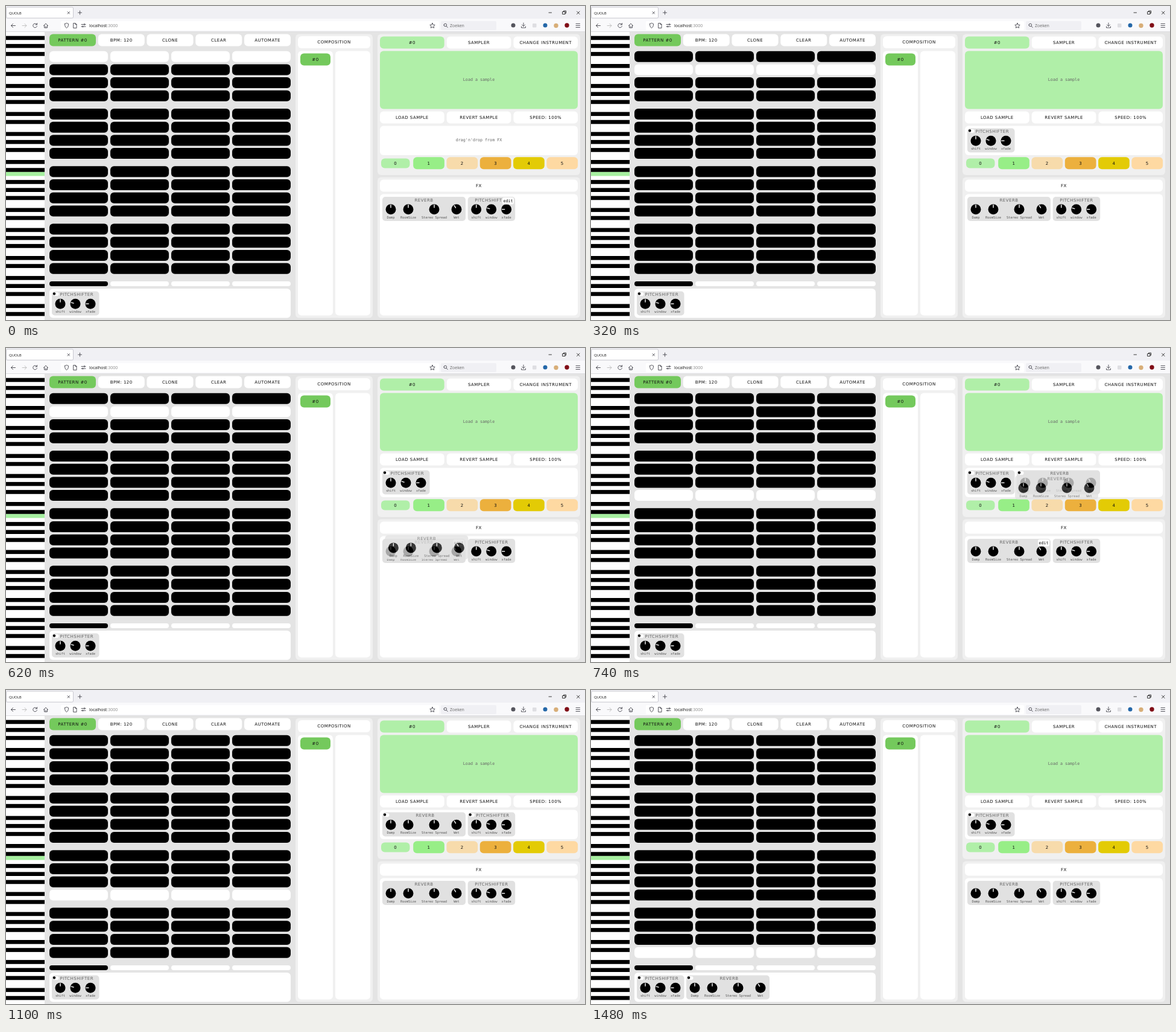
Animation, 960 px wide and 520 px high, one loop 1500 ms. Source, as an HTML page:

```html
<!DOCTYPE html>
<html lang="en">
<head>
<meta charset="utf-8">
<title>Pattern sequencer</title>
<style>
html, body { margin: 0; width: 100%; height: 100%; overflow: hidden; background: #e4e4e4; }
svg { display: block; width: 960px; height: 520px; }
text { fill: #111; }
.caps { font: 7px "DejaVu Sans", sans-serif; letter-spacing: .5px; }
.low { font: 6.7px "DejaVu Sans Mono", monospace; }
.tiny { font: 5.4px "DejaVu Sans Mono", monospace; fill: #555; }
.ui { font: 7px "Open Sans", sans-serif; }
.mid { text-anchor: middle; }
.soft { fill: #666; }
.icon { fill: none; stroke: #45454d; stroke-width: .9; stroke-linecap: round; stroke-linejoin: round; }
</style>
</head>
<body>
<svg id="stage" viewBox="0 0 960 520"></svg>
<script>
const LOOP = 1500, STEP = 20;
const stage = document.getElementById('stage');

function add(parent, tag, attrs, content) {
  const el = document.createElementNS('http://www.w3.org/2000/svg', tag);
  for (const key in attrs) el.setAttribute(key, attrs[key]);
  if (content !== undefined) el.textContent = content;
  parent.appendChild(el);
  return el;
}
const box = (x, y, width, height, fill = '#fff', rx = 0, parent = stage) =>
  add(parent, 'rect', { x, y, width, height, fill, rx });
const label = (x, y, str, cls = 'caps mid', parent = stage) =>
  add(parent, 'text', { x, y, class: cls }, str);
const dot = (cx, cy, r, fill, parent = stage) => add(parent, 'circle', { cx, cy, r, fill });
const icon = (d, stroke) => add(stage, 'path', { d, class: 'icon', ...(stroke && { style: 'stroke:' + stroke }) });

function button(x, y, w, h, str, fill = '#fff') {
  box(x, y, w, h, fill, 6);
  label(x + w / 2, y + h / 2 + 2.3, str);
}

function browser() {
  box(0, 0, 960, 22, '#f0f0f4');
  box(0, 21, 960, 22, '#f9f9fb');
  box(0, 42, 960, 1, '#dcdcdf');
  box(.5, 2, 111, 18, '#fff', 2).setAttribute('stroke', '#c9c9d0');
  label(5, 13.5, 'QUOLB', 'ui').style.fontSize = '6px';
  icon('M102 9.5l3.5 3.5m0-3.5l-3.5 3.5M119.5 11h6m-3-3v6');
  icon('M900 11h4.5M923 9.5h4v4h-4zM924.5 9.5v-1.500h4v4h-1.500M946.500 9l4.500 4.500m0-4.500l-4.500 4.500', '#222');
  box(91, 25, 627, 15, '#fff', 2);
  box(721, 25, 92, 15, '#f0f0f4', 2);
  icon('M15.500 32.500h-7m3-3l-3 3l3 3');
  icon('M27 32.500h7m-3-3l3 3l-3 3', '#bbb');
  icon('M51 30.500a3.400 3.400 0 1 0 .4 3M51.500 28.500v2.500h-2.500');
  icon('M62.500 32.500l3.500-3.500l3.500 3.500M63.500 32v4h5v-4M66 36v-2.500');
  icon('M97.500 29.500l3-1.200l3 1.200c0 4-.8 5.500-3 7c-2.200-1.500-3-3-3-7z');
  icon('M112 28.500h3l2 2v6h-5zM115 28.500v2h2');
  icon('M125 30.500h3.500m2.500 0h1M125 34h1m2.500 0h3.500');
  icon('M129 30.500a1 1 0 1 0 2 0a1 1 0 1 0-2 0M126.300 34a1 1 0 1 0 2 0a1 1 0 1 0-2 0');
  icon('M707 28.300l1.300 2.700l2.900.4l-2.100 2l.5 2.900l-2.600-1.400l-2.600 1.400l.5-2.900l-2.100-2l2.900-.4z');
  const url = label(138, 35, 'localhost', 'ui');
  add(url, 'tspan', { fill: '#888' }, ':3000');
  icon('M726 31.500a2.300 2.300 0 1 0 4.600 0a2.300 2.300 0 1 0-4.600 0M730 33.300l2.300 2.300');
  label(736, 35, 'Zoeken', 'ui soft');
  dot(841, 32, 3.5, '#55555d');
  icon('M858 28v5.500m-2.500-2.500l2.500 2.500l2.500-2.500M854.500 34v2h7v-2');
  box(873, 29, 6.500, 6.500, '#dedee2', 1);
  dot(894, 32, 3.500, '#2467a8');
  dot(912, 32.500, 3.700, '#d8ae78');
  dot(930, 32, 3.700, '#800d16');
  icon('M945 29.500h6.500m-6.500 3h6.500m-6.500 3h6.500');
}

function piano() {
  const h = 477 / 72;
  box(0, 43, 64, 477);
  for (let k = 0; k < 72; k++) {
    const black = [1, 3, 5, 8, 10].includes(k % 12);
    if (black || k === 35) box(0, 43 + k * h, 64, h, black ? '#000' : '#a6efa0');
  }
}

function pattern() {
  ['PATTERN #0', 'BPM: 120', 'CLONE', 'CLEAR', 'AUTOMATE'].forEach((str, i) =>
    button(72 + i * 80.75, 46.500, 77, 20, str, i ? '#fff' : '#74c95c'));
  const rows = [];
  for (let r = 0; r < 16; r++) {
    const g = add(stage, 'g', {});
    const y = 74.700 + (r >> 2) * 95.300 + (r % 4) * 21.700;
    for (let c = 0; c < 4; c++)
      add(g, 'rect', { x: 72 + c * 101, y, width: 97, height: 18, rx: 6 });
    rows.push(g);
  }
  for (let c = 0; c < 4; c++) box(72 + c * 101, 456, 97, 8, c ? '#fff' : '#000', 4);
  box(72, 468, 400, 48.500, '#fff', 6);
  return rows;
}

function composition() {
  box(480, 46.500, 128, 470, '#f0f0f0', 6);
  button(484, 50, 120, 20, 'COMPOSITION');
  box(484, 74.500, 58, 438, '#fff', 6);
  box(546, 74.500, 58, 438, '#fff', 6);
  button(488, 78.500, 50, 20, '#0', '#74c95c');
}

function instrument() {
  const pale = '#b0efa8';
  box(616, 46.500, 336, 233.500, '#f0f0f0', 6);
  const trio = (y, names) => names.forEach((str, i) =>
    button(620 + i * 110.700, y, 106.700, 20, str, y < 60 && !i ? pale : '#fff'));
  trio(50.500, ['#0', 'SAMPLER', 'CHANGE INSTRUMENT']);
  box(620, 74.500, 328, 96, pale, 6);
  label(784, 124.300, 'Load a sample', 'low mid soft');
  trio(174.500, ['LOAD SAMPLE', 'REVERT SAMPLE', 'SPEED: 100%']);
  box(620, 198.500, 328, 48.500, '#fff', 6);
  ['#97ee87', '#f7dbab', '#ecb03d', '#e3cb05', '#fed9a2'].forEach((fill, i) =>
    button(675.200 + i * 55.300, 250.300, 51.700, 20, i + 1, fill));
  button(622, 252.400, 47.500, 16, '0', pale);

  box(616, 283.500, 336, 233, '#f0f0f0', 6);
  button(620, 287.500, 328, 20, 'FX');
  box(620, 311.500, 328, 201, '#fff', 6);
}

// Each knob: offset, pointer angle, caption
const KINDS = {
  PITCHSHIFTER: { w: 78.500, knobs: [[14, 0, 'shift'], [39, -72, 'window'], [64, -90, 'xfade']] },
  REVERB: { w: 138, knobs: [[14, 0, 'Damp'], [43, 0, 'RoomSize'], [86, 0, 'Stereo Spread'], [123, -30, 'Wet']] }
};

function unit(name, toggle) {
  const g = add(stage, 'g', {}), { w, knobs } = KINDS[name];
  box(0, 0, w, 40, '#e1e1e1', 5, g);
  if (toggle) {
    box(1.500, 1.500, 10, 6, '#fff', 3, g);
    g.knob = dot(4, 4, 2.200, '#000', g);
  }
  label(w / 2 + (toggle ? 2 : 0), 7.500, name, 'caps mid soft', g);
  for (const [x, angle, caption] of knobs) {
    dot(x, 20.700, 8.500, '#000', g);
    add(g, 'path', {
      d: `M${x} 18.200v-5.200`, stroke: '#fff', 'stroke-width': 1.400,
      transform: `rotate(${angle} ${x} 20.700)`
    });
    label(x, 35.700, caption, 'tiny mid', g);
  }
  return g;
}

function place(el, x, y, shown = true, opacity = 1) {
  el.setAttribute('transform', `translate(${x} ${y})`);
  el.setAttribute('opacity', opacity);
  show(el, shown);
}
const show = (el, on) => el.setAttribute('visibility', on ? 'visible' : 'hidden');

// Position along [time, x, y] points, eased between neighbours
function along(path, t) {
  if (t < path[0][0] || t >= path[path.length - 1][0]) return null;
  const i = path.findIndex(p => p[0] > t);
  const [t0, x0, y0] = path[i - 1], [t1, x1, y1] = path[i];
  const u = (t - t0) / (t1 - t0), k = u * u * (3 - 2 * u);
  return [x0 + (x1 - x0) * k, y0 + (y1 - y0) * k];
}

browser();
piano();
const rows = pattern();
composition();
instrument();

const hint = label(784, 224.300, "drag'n'drop from FX", 'low mid soft');
place(unit('REVERB'), 624, 316);
place(unit('PITCHSHIFTER'), 765.700, 316);
place(unit('PITCHSHIFTER', true), 76, 472.500);
const pitch = unit('PITCHSHIFTER', true);
const reverb = unit('REVERB', true);
const placed = unit('REVERB', true);
const edit = add(stage, 'g', {});
box(0, 0, 19, 11.500, '#fff', 3, edit);
label(9.500, 8, 'edit', 'low mid', edit);

const drags = [
  [unit('PITCHSHIFTER'), [[20, 765.700, 316], [180, 761.500, 209.500], [240, 758, 208]]],
  [unit('REVERB'), [[600, 624, 316], [740, 703, 211], [820, 701, 208]]],
  [unit('REVERB', true), [[900, 706, 202.500], [1040, 632, 206]]],
  [unit('REVERB', true), [[1160, 624, 202.500], [1300, 267.500, 457], [1400, 180, 470]]]
];

function draw(now) {
  const frame = Math.floor((now % LOOP) / STEP), t = frame * STEP;
  const active = Math.floor(frame * 16 / 15 + .45) % 16;
  rows.forEach((row, i) => row.setAttribute('fill', i === active ? '#fff' : '#000'));

  const dropped = t >= 140, swapped = t >= 980 && t < 1240;
  const bypass = t >= 400 && t < 540;
  show(hint, !dropped);
  place(pitch, swapped ? 765.700 : 624, 202.500, dropped, bypass ? .5 : 1);
  pitch.knob.setAttribute('cx', bypass ? 8 : 4);
  place(reverb, swapped ? 624 : 706, 202.500, t >= 700 && t < 1240);
  place(placed, 158, 472.500, t >= 1340);
  place(edit, t < 300 ? 823 : 741, 317, t < 240 || (t >= 580 && t < 820));

  for (const [ghost, path] of drags) {
    const at = along(path, t);
    if (at) place(ghost, at[0], at[1], true, .75);
    else show(ghost, false);
  }
}

function tick() {
  draw(performance.now());
  requestAnimationFrame(tick);
}
tick();
</script>
</body>
</html>
```
